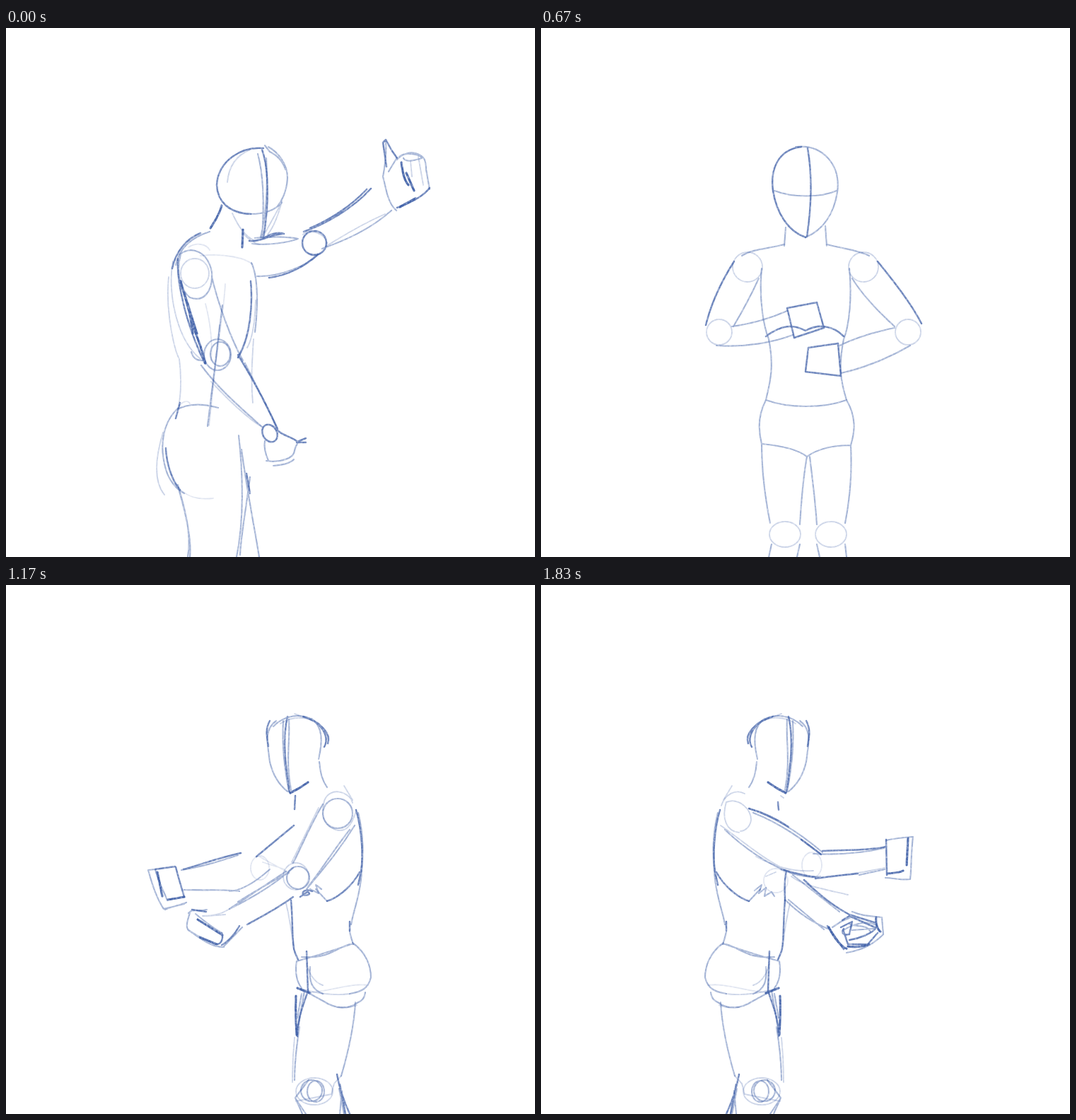
Write an HTML page that moves like this. It is 748 by 748 pixels and loops after 2 s.

```html
<!DOCTYPE html>
<html lang="en">
<head>
<meta charset="utf-8">
<title>Pencil dance</title>
<style>
html, body { margin: 0; width: 100%; height: 100%; overflow: hidden; background: #fff; }
svg { display: block; width: 100vw; height: 100vh; }
.ink { fill: none; stroke: #4060a8; stroke-linecap: round; stroke-linejoin: round; filter: url(#grain); }
/* pencil pressure, from firm to faint */
.h { stroke-width: 3.2; stroke-opacity: .95; }
.d { stroke-width: 2.5; stroke-opacity: .78; }
.m { stroke-width: 2.2; stroke-opacity: .48; }
.l { stroke-width: 1.9; stroke-opacity: .28; }
.x { stroke-width: 1.8; stroke-opacity: .17; }

.turn, .pose { animation: 2s step-end infinite; }
.turn { transform-origin: 374px 374px; animation-name: turn; }
.pose { opacity: 0; }
.thumb { animation-name: thumb; }
.low { animation-name: low; }
.swap { animation-name: swap; }
.high { animation-name: high; }
.front { animation-name: front; }
@keyframes turn { 0%, 91.5%, 100% { transform: none; } 41.5% { transform: scaleX(-1); } }
@keyframes thumb { 0%, 50% { opacity: 1; } 8.5%, 58.5%, 100% { opacity: 0; } }
@keyframes low { 0%, 16.5%, 50%, 66.5%, 100% { opacity: 0; } 8.5%, 41.5%, 58.5% { opacity: 1; } }
@keyframes swap { 0%, 25%, 75%, 100% { opacity: 0; } 16.5%, 66.5% { opacity: 1; } }
@keyframes high { 0%, 33.5%, 83.5% { opacity: 0; } 25%, 75%, 91.5%, 100% { opacity: 1; } }
@keyframes front { 0%, 41.5%, 91.5%, 100% { opacity: 0; } 33.5%, 83.5% { opacity: 1; } }
</style>
</head>
<body>
<svg viewBox="0 0 748 748">
<defs>
  <filter id="grain" filterUnits="userSpaceOnUse" x="0" y="0" width="748" height="748" color-interpolation-filters="sRGB">
    <feTurbulence type="fractalNoise" baseFrequency=".3" numOctaves="2" seed="4"/>
    <feColorMatrix values="0 0 0 0 0  0 0 0 0 0  0 0 0 0 0  0 0 0 1 .4" result="paper"/>
    <feGaussianBlur in="SourceGraphic" stdDeviation=".55"/>
    <feComposite in2="paper" operator="in"/>
  </filter>

  <!-- leaning body -->
  <g id="lean">
    <path class="d" d="M364 170C334 167 300 187 298 222C299 245 315 262 346 263M362 172C372 200 372 250 364 296"/>
    <path class="m" d="M346 263C362 263 378 260 390 247M371 168C385 176 398 192 398 212C397 232 389 246 384 252M356 178C362 200 366 240 362 296M368 184C370 220 369 260 360 296M366 166L373 175C384 180 392 190 395 200"/>
    <path class="l" d="M345 172C326 180 315 195 313 218M390 245C385 265 378 282 370 292M387 252L364 294M320 262C328 280 338 294 350 300M336 290C340 298 352 304 358 306"/>
    <path class="d" d="M344 301C360 303 372 292 393 291C385 288 375 291 366 296"/>
    <path class="m" d="M348 305C370 308 400 303 413 298C395 294 375 295 352 297"/>
    <path class="h" d="M305 251C302 264 294 275 289 283M335 285L334 310"/>
    <path class="d" d="M275 290C255 298 240 316 235 340"/>
    <path class="m" d="M288 288C262 296 245 312 240 335"/>
    <path class="x" d="M258 310C270 302 284 306 288 314M275 322C310 318 340 326 348 334M310 362C308 400 300 450 290 520M282 390C290 420 292 450 290 470"/>
    <path class="m" d="M347 332C356 350 357 390 352 430M306 392L285 563M241 540C258 530 278 531 300 537M245 536C222 556 216 590 226 624C230 638 240 652 252 658"/>
    <path class="d" d="M346 358C349 390 346 436 328 466M246 530L240 552"/>
    <path class="l" d="M353 385C352 420 348 440 341 452M302 420C296 480 290 530 287 562M230 352C225 400 238 455 245 468C249 500 247 522 243 540M236 330C228 370 240 440 275 468M350 440C348 470 346 500 349 530M222 572C212 605 208 640 224 660"/>
    <path class="x" d="M244 650C256 664 275 667 293 665M245 534C252 526 258 527 260 531"/>
    <path class="m" d="M243 646C256 690 262 720 257 748M245 655C258 700 262 730 260 748M329 576C334 620 338 690 326 748M333 596C340 650 352 710 358 748M345 635C338 690 332 720 331 745"/>
    <path class="d" d="M226 594C227 620 237 643 246 653M340 630L345 658"/>
  </g>
  <g id="dropFore">
    <ellipse class="m" cx="299" cy="462" rx="19" ry="22"/>
    <ellipse class="m" cx="303" cy="461" rx="14" ry="17"/>
    <path class="d" d="M328 462C345 490 370 535 384 568"/>
    <path class="m" d="M338 474L384 566M276 477C300 510 335 540 362 564M262 458C265 469 272 471 280 470"/>
    <path class="l" d="M290 500C320 532 340 550 360 563"/>
    <ellipse class="d" cx="373" cy="573" rx="10" ry="13" transform="rotate(-30 373 573)"/>
    <path class="d" d="M384 569C392 577 405 578 412 585L424 580M411 586L424 586"/>
    <path class="m" d="M412 588C406 595 410 602 403 606C395 612 380 614 368 612M366 584C364 595 368 605 371 612M378 619C390 618 402 616 407 610"/>
  </g>
  <g id="thumbFore">
    <circle class="d" cx="436" cy="304" r="17"/>
    <path class="l" d="M420 292C430 283 450 290 454 304C453 318 438 324 424 317M452 309C490 285 520 270 536 263"/>
    <path class="d" d="M421 288C450 278 490 256 516 227M430 283C460 270 490 250 510 228"/>
    <path class="m" d="M447 312C480 300 515 285 545 258M537 160C538 175 536 195 533 210L539 235C543 248 548 255 552 258M553 183L541 203M553 186C560 178 572 174 582 178C592 182 594 188 594 200L599 228M556 182C565 175 585 178 588 184C575 188 565 190 562 184"/>
    <path class="d" d="M533 162L537 158L546 174L553 184M533 162L538 196M553 254C570 248 590 238 599 226"/>
    <path class="h" d="M559 190C561 205 563 215 569 222M566 205L577 230M557 253L579 241"/>
    <path class="l" d="M572 188L574 210M583 182L590 222"/>
  </g>

  <!-- upright body -->
  <g id="stand">
    <path class="d" d="M293 224C288 211 302 194 328 186M298 229C292 218 297 206 308 195M350 186C358 220 352 260 347 293M375 192C382 205 379 215 377 228"/>
    <path class="m" d="M316 189C300 200 300 220 306 246M312 192C330 180 355 184 370 200M305 250C304 265 300 278 294 286M348 190C346 220 353 250 345 290M356 192C358 230 354 260 348 292M366 192C384 205 378 225 375 250C370 272 360 284 350 292"/>
    <path class="l" d="M305 196C325 184 345 186 360 196M322 189L340 182"/>
    <path class="h" d="M321 279L333 287L346 294"/>
    <path class="d" d="M253 318C244 350 243 385 246 405L250 424M248 406C258 425 278 442 294 447M262 476L262 489"/>
    <path class="m" d="M250 322C242 355 243 380 245 405C247 440 257 460 260 480M294 447L310 430M262 490C260 500 258 505 257 508"/>
    <path class="d" d="M345 446C342 480 344 505 340 518L335 530M323 518L321 575"/>
    <path class="l" d="M352 450C346 475 343 500 341 515"/>
    <path class="m" d="M258 506C238 520 232 540 232 555C236 570 244 575 262 578M257 507C272 512 300 522 337 532M262 508C285 515 290 528 330 526M337 532C340 550 336 562 330 570M318 540C320 560 316 572 300 578M240 576C242 590 250 588 256 594C270 600 285 598 300 588L322 576"/>
    <path class="l" d="M300 566C312 562 322 548 323 530M262 578C290 582 315 575 336 570M252 594C262 598 272 598 280 597"/>
    <path class="x" d="M236 566C260 562 290 575 318 576"/>
    <path class="h" d="M318 577L336 570M338 581C339 600 338 620 337 636"/>
    <path class="d" d="M322 577C330 600 336 615 336 638"/>
    <path class="m" d="M254 590C256 625 264 660 274 694M326 574L337 637M330 578L336 612M333 625C337 650 340 680 340 700"/>
    <path class="l" d="M340 640C342 660 343 680 343 703M284 705L288 720L338 730M274 694L284 705"/>
    <ellipse class="l" cx="312" cy="716" rx="26" ry="19"/>
    <circle class="m" cx="316" cy="715" r="15"/>
    <ellipse class="m" cx="310" cy="716" rx="12" ry="15"/>
    <path class="d" d="M280 692C276 715 268 735 262 748M276 706L268 748"/>
    <path class="m" d="M277 712L270 748M273 715L276 748M320 700L339 725C335 735 331 742 329 748M338 727L324 748"/>
    <path class="l" d="M270 284L258 304"/>
  </g>
</defs>

<g class="ink"><g class="turn">
  <g class="pose thumb">
    <use href="#lean"/>
    <use href="#dropFore"/>
    <use href="#thumbFore"/>
    <ellipse class="l" cx="267" cy="347" rx="20" ry="21"/>
    <path class="m" d="M246 320C262 308 285 315 291 345C293 375 278 388 260 381C246 370 240 345 247 320M291 352C300 390 318 440 335 470"/>
    <path class="d" d="M243 326C241 360 255 420 281 474"/>
    <path class="h" d="M247 358C254 385 262 405 264 432M252 375L270 432M257 390L268 430M264 420L275 450L282 474"/>
    <path class="m" d="M355 351C390 352 425 335 440 322"/>
    <path class="d" d="M372 353C400 350 425 335 441 320"/>
  </g>

  <g class="pose swap">
    <use href="#lean" x="12"/>
    <use href="#dropFore" x="22"/>
    <use href="#thumbFore" x="-3" y="9"/>
    <ellipse class="l" cx="279" cy="347" rx="20" ry="21"/>
    <path class="m" d="M258 320C274 308 297 315 303 345C305 375 290 388 272 381C258 370 252 345 259 320M292 319C335 320 380 312 418 300"/>
    <path class="d" d="M280 383C330 382 395 358 438 330"/>
    <path class="m" d="M287 378C335 376 390 356 432 331"/>
  </g>

  <g class="pose low">
    <use href="#stand"/>
    <path class="d" d="M339 298L340 317M341 340L394 384"/>
    <circle class="m" cx="279" cy="323" r="21"/>
    <path class="l" d="M258 308C262 292 290 284 298 305C303 325 300 340 282 346C268 350 260 342 253 320M306 315L344 392"/>
    <path class="m" d="M255 340C280 380 300 402 323 430M262 346C285 375 300 400 321 427M300 310C318 340 330 370 342 393"/>
    <circle class="m" cx="335" cy="414" r="16"/>
    <ellipse class="l" cx="338" cy="412" rx="18" ry="19"/>
    <path class="d" d="M315 433C322 430 330 432 328 438C320 440 316 436 322 434L332 441"/>
    <path class="m" d="M302 430L310 424L306 436L318 430M342 400C370 425 405 445 432 458M352 405L432 458M348 407C375 420 390 430 420 448"/>
    <path class="d" d="M342 441C365 458 385 468 407 480"/>
    <ellipse class="x" cx="389" cy="400" rx="13" ry="17"/>
    <path class="x" d="M350 406L390 384M354 402L385 392"/>
    <path class="d" d="M416 379C445 385 475 396 497 402"/>
    <path class="m" d="M420 382C450 392 470 398 500 403M375 402C395 420 415 432 432 433M418 433C440 430 465 432 496 431"/>
    <path class="d" d="M508 399C504 415 499 430 496 441M509 398L537 402"/>
    <path class="h" d="M496 441L519 445M534 406L527 440"/>
    <path class="m" d="M537 402L547 403C541 425 534 445 525 458L496 451M537 402C533 420 524 434 520 446M493 449C500 452 515 455 523 459"/>
    <path class="d" d="M418 482C425 495 435 505 443 509M443 492C440 500 444 508 450 508"/>
    <path class="h" d="M450 508L474 498M442 495L477 473"/>
    <path class="m" d="M414 484L440 511M443 492C455 485 468 475 480 465M474 498L490 488M488 464C492 475 494 485 490 488C475 498 460 512 440 512M464 459C475 462 485 457 490 464"/>
    <path class="l" d="M432 458C445 466 455 468 470 468M438 466L464 468"/>
    <path class="d" d="M465 462L485 459"/>
  </g>

  <g class="pose high">
    <use href="#stand"/>
    <path class="d" d="M335 307L336 318M347 405C343 420 345 435 345 446"/>
    <path class="l" d="M339 298L343 301M262 307C255 330 262 348 280 350M262 307C280 300 298 318 297 332C296 342 288 348 282 348M255 312C260 296 275 288 288 295"/>
    <path class="m" d="M294 316C330 328 365 350 398 378M300 322C340 338 370 360 395 380M260 346C285 370 320 395 355 408C370 412 385 414 395 412"/>
    <path class="l" d="M254 340C285 362 318 390 345 402M304 384C330 398 355 406 385 404"/>
    <path class="d" d="M294 316C315 322 335 332 350 342M368 360L396 381M340 402C360 408 372 411 388 413"/>
    <ellipse class="x" cx="383" cy="396" rx="14" ry="18"/>
    <circle class="x" cx="332" cy="418" r="17"/>
    <path class="d" d="M398 376C430 374 460 376 488 370M388 415C410 412 430 410 448 408"/>
    <path class="m" d="M385 380C420 382 450 380 485 372M450 410L486 402"/>
    <path class="l" d="M410 413C440 408 465 405 486 400"/>
    <path class="d" d="M488 360L489 410"/>
    <path class="h" d="M490 408C500 407 507 407 512 404M519 358L517 396"/>
    <path class="m" d="M488 361C500 358 512 357 526 356C523 380 524 400 522 416C510 418 498 414 487 414"/>
    <path class="l" d="M354 412C370 425 400 430 434 438M318 412L332 406"/>
    <path class="d" d="M372 417C395 440 415 455 436 466M405 482L428 515M436 466L474 478"/>
    <path class="m" d="M356 410L422 462M345 445C365 465 385 478 408 487M350 445L400 487M440 462C455 468 465 468 482 470L484 494C470 508 455 516 432 520M302 432L312 424L308 436L318 428L316 440L326 434L330 440"/>
    <path class="h" d="M407 484C415 500 425 512 432 514M474 470C472 480 478 490 480 490M434 511C440 512 455 512 464 508"/>
    <path class="d" d="M424 484L440 476L436 494C425 496 425 490 428 486M436 502C450 500 470 492 474 484M426 474L436 468L472 484M428 490L434 508L462 508L476 492"/>
    <path class="m" d="M428 488C440 480 460 474 472 480M440 488L470 486M437 480C450 484 460 480 466 490M412 484L424 476L438 470"/>
  </g>

  <g class="pose front">
    <path class="d" d="M368 168C335 172 324 200 328 230C333 262 350 288 374 296M377 170C384 210 382 255 376 295"/>
    <path class="m" d="M360 168C400 164 424 195 419 232C414 264 398 286 374 296M330 230C355 240 396 240 418 230M346 282L344 308M402 280L404 308"/>
    <path class="m" d="M344 306C322 312 300 312 284 322M404 306C428 312 448 314 464 322M312 340C308 380 314 420 322 440C330 480 324 500 318 526M436 340C440 380 436 420 428 440C420 480 424 500 432 526"/>
    <circle class="l" cx="292" cy="338" r="21"/>
    <circle class="l" cx="456" cy="338" r="21"/>
    <path class="d" d="M273 330C254 360 240 392 233 420M476 330C500 360 524 390 538 418M318 436C340 420 356 418 374 428C392 418 412 420 428 436"/>
    <path class="m" d="M308 354C296 380 284 402 272 422M440 354C456 380 478 402 500 422"/>
    <circle class="l" cx="252" cy="430" r="18"/>
    <circle class="l" cx="519" cy="430" r="18"/>
    <path class="m" d="M270 422C300 418 330 408 348 400M248 449C290 452 330 444 356 434M500 424C470 430 440 440 420 450M522 449C490 468 452 482 424 488"/>
    <path class="d" d="M348 396L390 388L400 424L358 438ZM420 446L378 452L374 486L424 492Z"/>
    <path class="m" d="M318 526C350 538 400 538 432 526C446 550 444 570 438 590C410 590 390 596 376 606C360 594 334 590 312 588C306 565 308 545 318 526M312 588C312 630 318 670 324 700M376 606C370 640 368 670 366 702M380 606C384 640 388 670 390 702M438 590C440 630 436 670 430 700M326 730L322 748M366 730L362 748M390 730L394 748M430 730L432 748"/>
    <ellipse class="l" cx="345" cy="716" rx="22" ry="18"/>
    <ellipse class="l" cx="410" cy="716" rx="22" ry="18"/>
  </g>
</g></g>
</svg>
</body>
</html>
```
